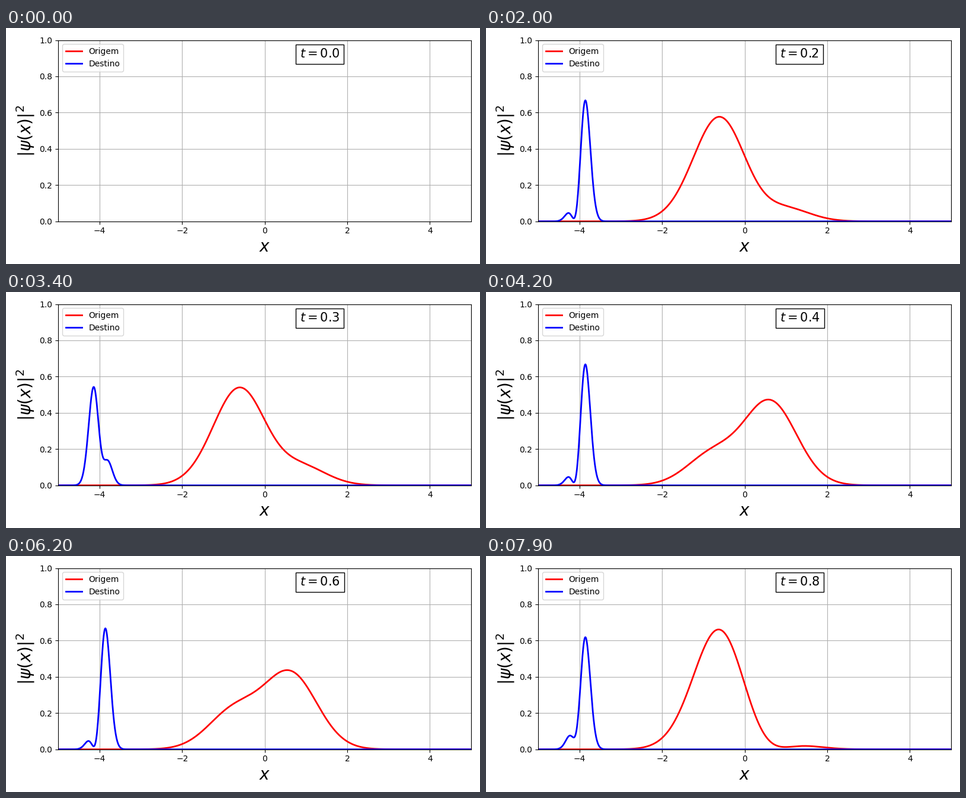
A matplotlib script for the animation above (8 s loop, 800x400 px).

```python
import numpy as np
import matplotlib.pyplot as plt
from matplotlib.animation import FuncAnimation

FRAMES, INTERVAL = 80, 100
DT = 0.01

x = np.linspace(-5, 5, 1000)


def density(center, k, c0, c1, phase):
    """|psi|^2 for a mix of the two lowest oscillator states."""
    u = k * (x - center)
    mix = c0**2 + 2 * (c1 * u)**2 + 2 * np.sqrt(2) * c0 * c1 * u * np.cos(phase)
    return np.exp(-u**2) / np.sqrt(np.pi) * mix


def origin(step):
    return density(0, 1, 0.8, 0.6, np.radians(7.17 * step - 2.17))


def destination(step):
    return density(-4, 5, np.sqrt(0.5), np.sqrt(0.5), np.pi / 10 * step)


fig, ax = plt.subplots(figsize=(8, 4), dpi=100)
ax.set(xlim=(-5, 5), ylim=(0, 1))
ax.set_xlabel("$x$", fontsize=20)
ax.set_ylabel(r"$|\psi(x)|^2$", fontsize=20)
ax.grid(True)

red, = ax.plot([], [], "r", lw=2, label="Origem")
blue, = ax.plot([], [], "b", lw=2, label="Destino")
ax.legend(loc="upper left")
fig.tight_layout()

clock = fig.text(0.62, 0.874, "", fontsize=15,
                 bbox={"facecolor": "w", "pad": 5})


def update(i):
    clock.set_text(f"$t = {i * DT:.1f}$")
    if i == 0:
        red.set_data([], [])
        blue.set_data([], [])
    else:
        red.set_data(x, origin(i - 1))
        blue.set_data(x, destination(i - 1))
    return red, blue, clock


anim = FuncAnimation(fig, update, frames=FRAMES, interval=INTERVAL,
                     init_func=lambda: update(0), repeat=True, repeat_delay=0)
plt.show()
```
